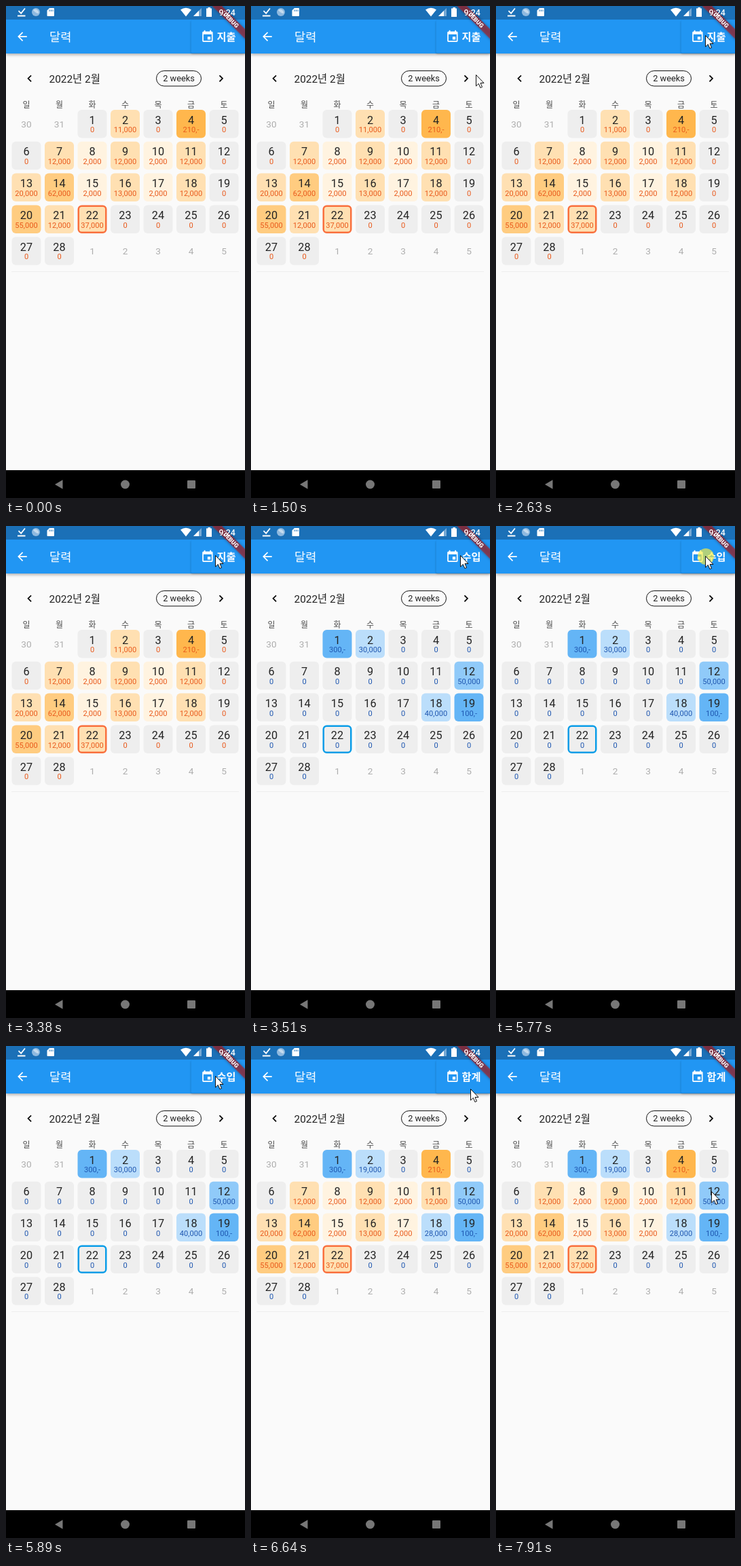
Animation of 352x725 px, one loop 8 s. Source, as an HTML page:

```html
<!DOCTYPE html>
<html lang="ko">
<head>
<meta charset="utf-8">
<title>달력</title>
<style>
  html, body { margin: 0; width: 100%; height: 100%; overflow: hidden; background: #fafafa; }
  svg { display: block; width: 352px; height: 725px; }
  text { font-family: Roboto, "Noto Sans CJK KR", "Noto Sans CJK", sans-serif; fill: #212121; }
  .mid text, text.mid { text-anchor: middle; }
  .white, .white text { fill: #fff; }
  .bar { filter: drop-shadow(0 2px 2px rgba(0, 0, 0, .3)); }
  .button { filter: drop-shadow(0 1px 1px rgba(0, 0, 0, .28)); }
  .banner { filter: drop-shadow(0 0 2px rgba(0, 0, 0, .5)); }
</style>
</head>
<body>
<svg viewBox="0 0 352 725">
  <rect width="352" height="725" fill="#fafafa"/>

  <!-- App bar -->
  <rect class="bar" y="0" width="352" height="70" fill="#2196f3"/>
  <rect class="button" x="272.5" y="21" width="90" height="48.5" rx="2" fill="#2196f3"/>
  <rect width="352" height="20" fill="#1b70b7"/>
  <g class="white">
    <path transform="translate(13.7 34.8) scale(.8556)" d="M20 11H7.83l5.59-5.59L12 4l-8 8 8 8 1.41-1.41L7.83 13H20z"/>
    <text x="64" y="51.5" font-size="17.6" font-weight="500">달력</text>
    <path transform="translate(286.6 35) scale(.8556)" fill-rule="evenodd" d="M17 12h-5v5h5zM16 1v2H8V1H6v2H5a2 2 0 0 0-2 2v14a2 2 0 0 0 2 2h14a2 2 0 0 0 2-2V5a2 2 0 0 0-2-2h-1V1zM19 19H5V8h14z"/>
    <text id="mode" x="310.5" y="51.3" font-size="15.2" font-weight="700"></text>
  </g>

  <!-- Status bar -->
  <g class="white">
    <path d="M18.5 7.2l3.7 3.6L28 3.5M17 14.5h11.5" fill="none" stroke="#fff" stroke-width="1.8"/>
    <circle cx="44" cy="9" r="6" fill="#8fb9df"/>
    <path d="M40 6a5 5 0 0 1 8 5q-4 0-8-5z" fill="#c5dbee"/>
    <path fill-rule="evenodd" d="M64 3h6a1 1 0 0 1 1 1v10a1 1 0 0 1-1 1h-8.500a1 1 0 0 1-1-1V6.500zM63.500 5.500v2.500h1v-2.500zM66 5.500v2.500h1v-2.500zM68.500 5.500v2.500h1v-2.500z"/>
    <path d="M257 5.600q8-5.600 16 0L265 15.500z"/>
    <path d="M288 3v12h-12z" opacity=".4"/>
    <path d="M284 7v8h-8z"/>
    <path d="M297.500 2h3.500v1.500h2V16h-8V3.500h2.500z"/>
  </g>
  <g transform="translate(352 0) rotate(45)">
    <rect class="banner" x="-50" y="24" width="100" height="10.200" fill="#b71c1c" fill-opacity=".63"/>
    <text class="mid white" y="32.200" font-size="8.700" font-weight="900">DEBUG</text>
  </g>
  <text id="clock" class="white" x="313.500" y="14" font-size="12.400" font-weight="500"></text>

  <!-- Calendar header -->
  <g transform="translate(24.500 96.600) scale(.8556)"><path d="M15.410 7.410L14 6l-6 6 6 6 1.410-1.410L10.830 12z"/></g>
  <g transform="translate(306.500 96.600) scale(.8556)"><path d="M10 6L8.590 7.410 13.170 12l-4.580 4.590L10 18l6-6z"/></g>
  <text x="63.500" y="113" font-size="15.400">2022년 2월</text>
  <rect x="221.500" y="95.500" width="66" height="22.500" rx="11.250" fill="none" stroke="#111"/>
  <text class="mid" x="254.500" y="111.300" font-size="12.800">2 weeks</text>
  <g id="grid" class="mid"></g>
  <path d="M8 391.500h335" stroke="#eee"/>

  <!-- Navigation bar -->
  <rect y="684" width="352" height="41" fill="#000"/>
  <g fill="#777">
    <path d="M72 705l11.500-6.800v13.600z"/>
    <circle cx="175.500" cy="705" r="6.500"/>
    <rect x="267" y="699" width="12" height="12" rx="1"/>
  </g>

  <circle id="tap" r="12" fill="#fff03c" fill-opacity=".65"/>
  <path id="cursor" d="M.5 .5V17l3.800-3.600L6.900 19.500l2.600-1.100L7 12.500h5z" fill="#fff" stroke="#111" stroke-linejoin="round"/>
</svg>

<script>
const LOOP = 8000;
const $ = id => document.getElementById(id);

// Amounts per day of the month, in thousands of won
const spending = [0, 11, 0, 210, 0, 0, 12, 2, 12, 2, 12, 0, 20, 62, 2, 13, 2, 12, 0, 55, 12, 37];
const earning = { 1: 300, 2: 30, 12: 50, 18: 40, 19: 100 };
const spent = day => -(spending[day - 1] || 0);
const earned = day => earning[day] || 0;

const ORANGE = { shades: ['#fff3e0', '#ffe0b2', '#ffcc80', '#ffb74d'], text: '#e9591b', border: '#f9703e' };
const BLUE = { shades: ['#e3f2fd', '#bbdefb', '#90caf9', '#64b5f6'], text: '#1e56b0', border: '#0a9de8' };
const TODAY = 22;

const modes = [
  { start: 0, name: '지출', amount: spent, zero: ORANGE },
  { start: 3510, name: '수입', amount: earned, zero: BLUE },
  { start: 6020, name: '합계', amount: day => spent(day) + earned(day), zero: BLUE },
];

// Pointer positions: time, x, y
const pointer = [
  [1500, 331, 101], [1620, 318, 66], [1750, 310, 43], [2630, 308, 43], [4120, 308, 44],
  [6150, 308, 47], [6270, 309, 50], [6640, 323, 63], [6760, 338, 98], [6890, 340, 155],
  [7010, 334, 195], [7140, 330, 215], [7910, 317, 214],
];
const taps = [[3260, 3380], [5770, 5890]];

const text = (x, y, size, fill, value) =>
  `<text x="${x}" y="${y}" font-size="${size}" fill="${fill}" style="fill:${fill}">${value}</text>`;

function cell(index, mode) {
  const day = index - 1;
  const x = 30 + index % 7 * 48.5;
  const y = 153 + Math.floor(index / 7) * 46.8;
  if (day < 1 || day > 28) {
    return text(x, y + 25.5, 13.7, '#aeaeae', day < 1 ? day + 31 : day - 28);
  }
  const amount = mode.amount(day);
  const size = Math.abs(amount);
  const palette = amount < 0 ? ORANGE : amount > 0 ? BLUE : mode.zero;
  const level = [10, 50, 100].filter(limit => size >= limit).length;
  const fill = size ? palette.shades[level] : '#eee';
  const label = size >= 100 ? size + ',-' : size ? size + ',000' : '0';
  const inset = day === TODAY ? 1.25 : 0;
  const border = inset ? `stroke="${palette.border}" stroke-width="2.5"` : '';
  return `<rect x="${x - 21.5 + inset}" y="${y + inset}" width="${43 - 2 * inset}"
      height="${41.5 - 2 * inset}" rx="${6 - inset}" fill="${fill}" ${border}/>`
    + text(x, y + 20.5, 16.3, '#242424', day)
    + text(x, y + 33.2, 11.1, palette.text, label);
}

function drawGrid(mode) {
  const weekdays = [...'일월화수목금토'].map((name, i) => text(30 + i * 48.5, 149.5, 12, '#4f4f4f', name));
  const cells = Array.from({ length: 35 }, (_, i) => cell(i, mode));
  $('grid').innerHTML = weekdays.concat(cells).join('');
  $('mode').textContent = mode.name;
}

let shownMode;
function draw(now) {
  const t = now % LOOP;
  const mode = modes.filter(m => t >= m.start).pop();
  if (mode !== shownMode) drawGrid(shownMode = mode);

  $('clock').textContent = t < 7390 ? '9:24' : '9:25';
  const [, x, y] = pointer.filter(p => t >= p[0]).pop() || [0, -50, -50];
  $('cursor').setAttribute('transform', `translate(${x} ${y})`);
  $('tap').setAttribute('transform', `translate(${x + 1} ${y + 1})`);
  $('tap').style.display = taps.some(([from, to]) => t >= from && t < to) ? '' : 'none';
}

const origin = performance.now();
function frame() {
  draw(performance.now() - origin);
  requestAnimationFrame(frame);
}
frame();
</script>
</body>
</html>
```
